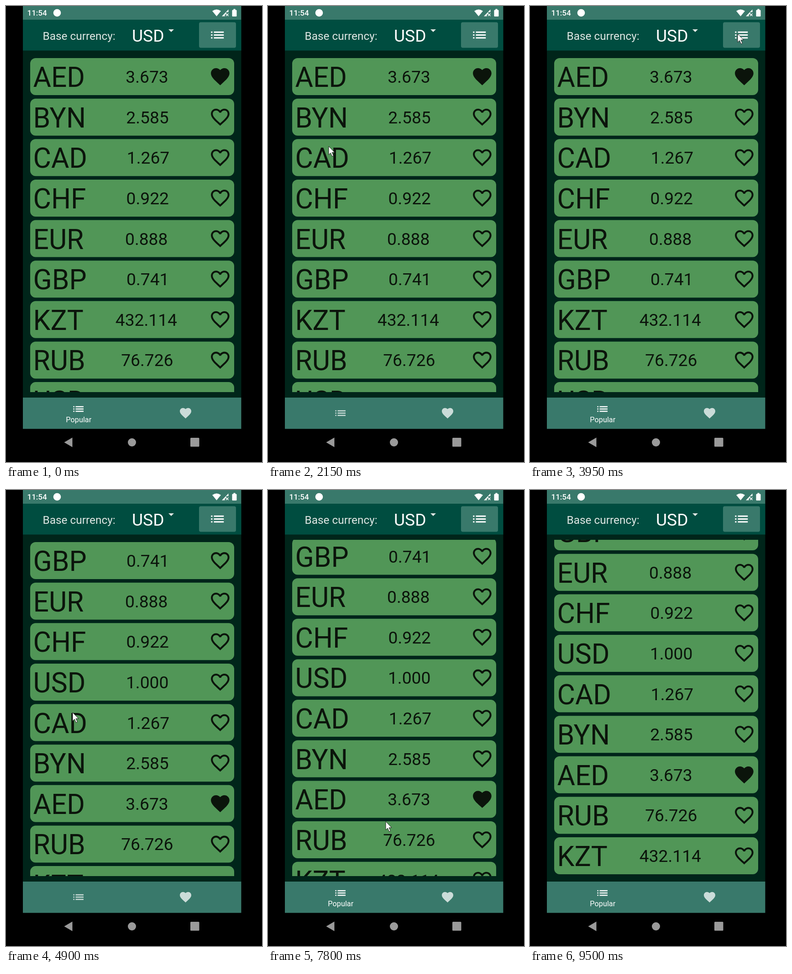
Write an HTML page that moves like this. It is 561x998 px and loops after 9550 ms.

```html
<!DOCTYPE html>
<html lang="en">
<head>
<meta charset="utf-8">
<style>
  html, body { margin: 0; width: 100%; height: 100%; overflow: hidden; background: #000; }
  body { position: relative; font-family: Roboto, sans-serif; }
  svg { display: block; position: absolute; overflow: visible; }
  .layer { left: 0; top: 0; width: 561px; height: 998px; }
  #list { position: absolute; left: 52.5px; top: 109px; width: 447px; height: 736px; overflow: hidden; }
  .row {
    position: absolute; left: 0; top: 4.5px; width: 447px; height: 81.6px; box-sizing: border-box;
    display: flex; align-items: center; padding: 0 54.5px 0 7px;
    border-radius: 12px; background: #519657; color: #0b140b; white-space: nowrap;
  }
  .row span { position: relative; top: .051em; line-height: 1.172; }
  .code { font-size: 60.5px; }
  .rate { flex: 1; text-align: center; font-size: 37.2px; }
  .row svg { right: 6px; top: 16px; width: 48.8px; height: 48.8px; fill: #0b140b; }
</style>
</head>
<body>
<svg class="layer" viewBox="0 0 561 998">
  <defs>
    <path id="lines" d="M3 13h2v-2H3zm0 4h2v-2H3zm0-8h2V7H3zm4 4h14v-2H7zm0 4h14v-2H7zM7 7v2h14V7z"/>
    <path id="heart" d="M12 21.35l-1.45-1.32C5.4 15.36 2 12.28 2 8.5 2 5.42 4.42 3 7.5 3c1.74 0 3.41.81 4.5 2.09C13.09 3.81 14.76 3 16.5 3 19.58 3 22 5.42 22 8.5c0 3.78-3.4 6.86-8.55 11.54z"/>
    <path id="outline" d="M16.5 3c-1.74 0-3.41.81-4.5 2.09C10.91 3.81 9.24 3 7.5 3 4.42 3 2 5.42 2 8.5c0 3.78 3.4 6.86 8.55 11.54L12 21.35l1.45-1.32C18.6 15.36 22 12.28 22 8.5 22 5.42 19.58 3 16.5 3zm-4.4 15.55l-.1.1-.1-.1C7.14 14.24 4 11.39 4 8.5 4 6.5 5.5 5 7.5 5c1.54 0 3.04.99 3.57 2.36h1.87C13.46 5.99 14.96 5 16.5 5c2 0 3.5 1.5 3.5 3.5 0 2.89-3.14 5.74-7.9 10.05z"/>
  </defs>
  <path fill="#00251a" d="M37 30h478.500v827h-478.500z"/>
  <path fill="#39796b" d="M37 0h478.500v30h-478.500zM37 857h478.500v68.500h-478.500z"/>

  <g fill="#fff">
    <text x="46.500" y="21" font-size="17" font-weight="500">11:54</text>
    <circle cx="112" cy="15" r="8.300"/>
    <path d="M452 11q9.500-7 19 0l-9.500 11.500z"/>
    <path d="M487.500 7.500v6h-5v5h-3v4h-6.500z"/>
    <path d="M482 16.500l5.500 5.500m0-5.500l-5.500 5.500" stroke="#fff" stroke-width="1.500"/>
    <path d="M498.500 8.500v-2h4v2h1.500q1.500 0 1.500 1.500v11.500q0 1.500-1.500 1.500h-7q-1.500 0-1.500-1.500v-11.500q0-1.500 1.500-1.500z"/>
  </g>

  <g id="header">
    <path fill="#004d40" d="M37 30h478.500v67.500h-478.500z"/>
    <rect x="423" y="35.500" width="81" height="56" rx="4" fill="#39796b"/>
    <g fill="#fff">
      <text x="80.500" y="74" font-size="24.400" fill="#dfe7e4">Base currency:</text>
      <text x="276" y="78" font-size="37.200">USD</text>
      <path fill="#dfe7e4" d="M356 51h12l-6 6z"/>
      <use href="#lines" transform="translate(444.700 44.900) scale(1.550)"/>
    </g>
  </g>

  <g id="sort" fill="#dce3de">
    <text x="276" y="132" font-size="48.800" text-anchor="middle">Sort by :</text>
    <g font-size="37.200">
      <text x="60.500" y="259">Name</text>
      <text x="60.500" y="439">Value</text>
    </g>
    <g font-size="30.200">
      <text x="73.500" y="314">Ascending</text>
      <text x="73.500" y="379">Descending</text>
      <text x="73.500" y="494">Ascending</text>
      <text x="73.500" y="560">Descending</text>
    </g>
  </g>

  <g fill="#fff">
    <g id="tab"><use href="#lines" transform="translate(143.700 -15) scale(1.250)"/></g>
    <text id="label" x="159.300" y="911" font-size="16.270" text-anchor="middle">Popular</text>
    <use href="#heart" fill-opacity=".74" transform="translate(378.500 876) scale(1.250)"/>
  </g>

  <g fill="#9a9a9a">
    <path d="M127.500 955l18-10.500v21z"/>
    <circle cx="276" cy="955" r="9"/>
    <rect x="404" y="945" width="19.500" height="19.500" rx="1.500"/>
  </g>
</svg>

<div id="list"></div>

<svg class="layer" viewBox="0 0 561 998">
  <path id="cursor" d="M0 0v18.500l4.200-4 3.300 7.500 3-1.300-3.300-7.300h5.800z" fill="#fff" stroke="#222" stroke-width="1"/>
</svg>

<script>
  const LOOP = 9550, PITCH = 88.64, MAX_SCROLL = 63, DRAG_Y = 735;
  const rates = {
    AED: '3.673', BYN: '2.585', CAD: '1.267', CHF: '0.922', EUR: '0.888',
    GBP: '0.741', KZT: '432.114', RUB: '76.726', USD: '1.000'
  };
  const byName = Object.keys(rates);
  const byValue = [...byName].sort((a, b) => rates[a] - rates[b]);

  const sortOpen = [[700, 2000], [4050, 4750]];
  const tabOff = [[2000, 2700], [4750, 5700]];
  const VALUE_SORT = 4750;

  // time, x, y of the pointer tip
  const path = [
    [200, 440, -30], [520, 456, 61], [700, 456, 61], [900, 458, -30],
    [1200, 300, -30], [1700, 133, 307], [2200, 133, 307],
    [2600, 160, 883], [3000, 160, 883], [3700, 455, 61], [4050, 455, 61],
    [4500, 146, 487], [4950, 146, 487], [5500, 160, 883], [5950, 160, 883],
    [6350, 258, DRAG_Y], [6500, 258, DRAG_Y], [6850, 258, 672], [7300, 258, 672],
    [7963, 258, DRAG_Y], [8120, 258, DRAG_Y], [8450, 258, 672], [8800, 258, -30]
  ];

  const $ = id => document.getElementById(id);
  const clamp = (v, lo, hi) => Math.min(hi, Math.max(lo, v));
  const within = (spans, t) => spans.some(([a, b]) => t >= a && t < b);
  const ease = u => u * u * (3 - 2 * u);

  const rows = byName.map(code => {
    const row = document.createElement('div');
    row.className = 'row';
    row.innerHTML = `<span class="code">${code}</span><span class="rate">${rates[code]}</span>
      <svg viewBox="0 0 24 24"><use href="#${code === 'AED' ? 'heart' : 'outline'}"/></svg>`;
    $('list').append(row);
    return row;
  });

  function pointer(t) {
    const i = path.findIndex(k => k[0] > t);
    if (i < 0) return path[path.length - 1].slice(1);
    if (i === 0) return path[0].slice(1);
    const [t0, x0, y0] = path[i - 1], [t1, x1, y1] = path[i];
    const u = ease((t - t0) / (t1 - t0));
    return [x0 + (x1 - x0) * u, y0 + (y1 - y0) * u];
  }

  // 1 while the first tab is selected, with a short shift either way
  function tabLevel(t) {
    return tabOff.reduce((v, [a, b]) =>
      v - clamp((t - a) / 110, 0, 1) + clamp((t - b) / 110, 0, 1), 1);
  }

  function draw(t) {
    const sorting = within(sortOpen, t);
    $('sort').style.display = sorting ? '' : 'none';
    $('header').style.display = $('list').style.display = sorting ? 'none' : '';

    const [x, y] = pointer(t);
    $('cursor').setAttribute('transform', `translate(${x} ${y})`);

    const scroll = t > 6000 ? clamp(DRAG_Y - y, 0, MAX_SCROLL) : 0;
    const order = t < VALUE_SORT ? byName : byValue;
    rows.forEach((row, i) => {
      row.style.transform = `translateY(${order.indexOf(byName[i]) * PITCH - scroll}px)`;
    });

    const on = ease(tabLevel(t));
    $('tab').setAttribute('transform', `translate(0 ${891 - 9 * on})`);
    $('tab').setAttribute('opacity', .74 + .26 * on);
    $('label').setAttribute('opacity', on);
  }

  const start = performance.now();
  function tick() {
    draw((performance.now() - start) % LOOP);
    requestAnimationFrame(tick);
  }
  tick();
</script>
</body>
</html>
```
